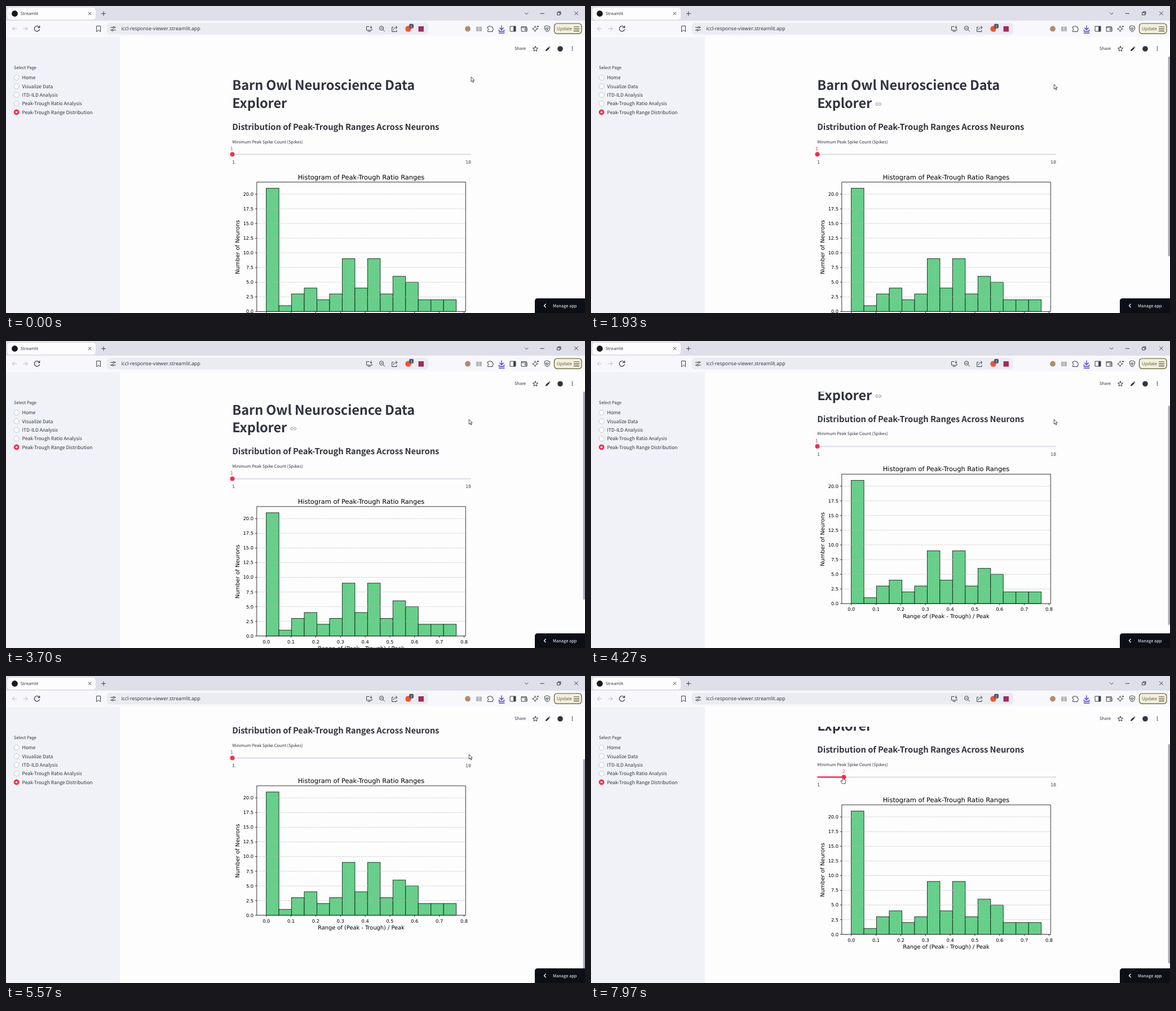
An HTML page for the animation above (8 s loop, 1027 by 545 pixels).

```html
<!DOCTYPE html>
<html lang="en">
<head>
<meta charset="utf-8">
<title>Data Explorer</title>
<style>
html, body { margin: 0; width: 100%; height: 100%; overflow: hidden; background: #fdfdfd; }
svg { display: block; width: 100vw; height: 100vh; }
text { text-rendering: geometricPrecision; white-space: pre; }
.ui { font-family: "Open Sans", "Noto Sans", sans-serif; }
.app { font-family: "Noto Sans CJK JP", "Noto Sans CJK SC", "Noto Sans CJK", "Noto Sans", sans-serif; fill: #31333f; }
.head { font-weight: 700; letter-spacing: -.005em; }
.mono { font-family: "DejaVu Sans Mono", monospace; font-size: 8.3px; fill: #4a4c57; }
.plot { font-family: "DejaVu Sans", sans-serif; fill: #000; }
.ico { fill: none; stroke: #3c3d4a; stroke-width: 1; stroke-linecap: round; stroke-linejoin: round; }
</style>
</head>
<body>
<svg viewBox="0 0 1027 545">
  <defs>
    <linearGradient id="strip">
      <stop offset="0" stop-color="#c9404c"/><stop offset=".35" stop-color="#e08c6c"/>
      <stop offset=".7" stop-color="#ecd08c"/><stop offset="1" stop-color="#f2eaa8"/>
    </linearGradient>
    <clipPath id="view"><path d="M202 90H1027V545H202z"/></clipPath>
    <g id="link" class="ico" style="stroke:#8d8f99">
      <path d="M-1.2-2.3H-2.6a2.3 2.3 0 0 0 0 4.6H-1.2M1.2-2.3H2.6a2.3 2.3 0 0 1 0 4.6H1.2M-1.8 0H1.8"/>
    </g>
  </defs>

  <!-- page content -->
  <g clip-path="url(#view)">
    <g id="page">
      <g id="titles"></g>
      <use id="link1" href="#link" x="509.7" y="174.2"/>
      <use id="link2" href="#link" x="775" y="214.7"/>
      <path d="M401.5 263.3H825" stroke="#e1e4ec" stroke-width="2.6"/>
      <path id="fill" stroke="#ee3350" stroke-width="2.6"/>
      <circle id="knob" cy="263.3" r="4" fill="#f0304c"/>
      <text id="value" class="mono" y="256" text-anchor="middle" style="fill:#e8455c"></text>
      <text class="mono" x="401" y="279.8">1</text>
      <text class="mono" x="825" y="279.8" text-anchor="end">10</text>
      <g id="chart"></g>
    </g>
    <rect id="thumb" x="1023.6" width="3.4" height="389.5" rx="1.7" fill="#a9aabb"/>
  </g>

  <!-- sidebar -->
  <path d="M0 55H202V545H0z" fill="#f0f2f7"/>
  <g id="side"></g>

  <!-- browser frame -->
  <path d="M0 0H1027V27H0z" fill="#dfdfe9"/>
  <path d="M0 26H1027V54H0z" fill="#f8f8fc"/>
  <rect x="2.5" y="3" width="156.5" height="21" rx="5" fill="#fdfdfe"/>
  <rect x="179" y="30" width="570" height="20.5" rx="5" fill="#ebebf2"/>
  <path d="M0 54.3H1027" stroke="url(#strip)" stroke-width="1.6"/>
  <circle cx="15.5" cy="13.5" r="5.4" fill="#17181f"/>
  <g class="ico">
    <path d="M146.200 11l4.600 4.600m0-4.600l-4.600 4.600M173 10v7m-3.500-3.500h7M920.500 12l2.800 2.800 2.800-2.800M948 13.300h6.500M1008.500 10l6 6m0-6l-6 6"/>
    <path d="M978 11.500h4.500V16H978zM979.500 11.500V10H984v4.500H982.500"/>
    <path d="M18.500 40.300H11.500m3.500-3.800L11.200 40.300 15 44.100M31 40.300H38m-3.500-3.800L38.300 40.300 34.500 44.100" stroke="#b9bac4"/>
    <path d="M59.200 38a4.700 4.700 0 1 0 .3 3.700M59.700 35.300V38.500H56.500" stroke-width="1.200"/>
    <path d="M161 35.500h6.500V45.500L164.200 42.700 161 45.500z"/>
    <path d="M185.500 38h4m3.500 0h1.500M185.500 42.800h1.500m4 0h3.500"/>
    <circle cx="191.200" cy="38" r="1.500"/><circle cx="188.800" cy="42.800" r="1.500"/>
    <path d="M644 36.500H639.500V43H649V41M642 45h4.500M647.500 35.500v4m-1.700-1.600 1.700 1.700 1.700-1.700"/>
    <circle cx="666" cy="39.300" r="3.600"/><path d="M668.700 42l3 3M664.400 39.300h3.200"/>
    <path d="M687 37.500H684.700V45.500H693V43M687.500 42.500c0-3 2-4.500 6-4.500M691.500 35.500l2.500 2.500-2.500 2.500"/>
    <path d="M854.500 37h2.300a1.600 1.600 0 1 1 3.200 0H863v2.800a1.600 1.600 0 1 1 0 3.200V45.500H854.500V43a1.600 1.600 0 1 0 0-3.200z"/>
    <path d="M879 35v7m-3.200-3 3.200 3.200 3.200-3.200M874.500 42.500V45H883.500V42.500M874.500 48h9.500" stroke="#4b35c8" stroke-width="1.300"/>
    <path d="M894.500 36h9.500v9h-9.500z"/><path d="M901 36.500h2.500v8H901z" fill="#3c3d4a"/>
    <path d="M914.500 36.500h8.500v2H924v6.500H914.500zM914.500 38.500H923M924 40.500H920.500v2.500H924"/>
    <path d="M938.500 35.500q.6 4.400 5 5-4.400.6-5 5-.6-4.400-5-5 4.400-.6 5-5zM943.500 35v2.500m-1.250-1.250h2.500"/>
    <path d="M960 35l4.500 1.500v3.500q-.3 4-4.500 6-4.200-2-4.500-6V36.500zM957.800 39h4.400l-2.200 4z"/>
  </g>
  <circle cx="713.500" cy="40.500" r="5.200" fill="#ee5530"/>
  <rect x="715" y="31.800" width="8" height="8" rx="2.500" fill="#4c5566"/>
  <text class="ui" x="719" y="38" font-size="5.5" fill="#fff" text-anchor="middle">2</text>
  <rect x="731.500" y="36" width="9.500" height="9.500" fill="#a02a62"/>
  <circle cx="819" cy="40.500" r="4.900" fill="#b08b6c"/>
  <path d="M834 36.500h4.600v8.500H834zM839.400 36.500H844v8.500h-4.600z" fill="#b4b5bd"/>
  <rect x="972.500" y="31" width="48.500" height="18.200" rx="5" fill="#f1efdd" stroke="#5f5b30" stroke-width="1.200"/>
  <path d="M1007 37h10M1007 40.700h10M1007 44.400h10" stroke="#4a4724" stroke-width="1.200"/>
  <text class="ui" x="977" y="43.300" font-size="7.9" fill="#5c582f">Update</text>
  <text class="ui" x="26" y="16.200" font-size="7.5" fill="#2c2d38">Streamlit</text>
  <text class="ui" x="204.300" y="43.400" font-size="8.85" fill="#2c2d38">iccl-response-viewer.streamlit.app</text>

  <!-- app header and footer button -->
  <g class="ico" style="stroke:#31333f">
    <path d="M939 71.500l1.300 3 3.200.3-2.400 2.100.7 3.200-2.800-1.700-2.800 1.700.7-3.200-2.400-2.100 3.200-.3z"/>
  </g>
  <path d="M957 80l.3-2.300 4.800-4.800 2 2-4.800 4.800zM962.700 72.300l.8-.8 2 2-.8.8z" fill="#31333f"/>
  <circle cx="983" cy="76" r="4.800" fill="#31333f"/>
  <path d="M1004.500 72.800v.01m0 2.890v.01m0 2.890v.01" stroke="#31333f" stroke-width="1.900" stroke-linecap="round"/>
  <path d="M938 545V524q0-5 5-5H1027V545z" fill="#0c0f16"/>
  <path d="M957.500 528.800l-3 3.200 3 3.200" fill="none" stroke="#fff" stroke-width="1.300"/>
  <g id="labels"></g>

  <g id="cursor" stroke="#222" stroke-width=".8" stroke-linejoin="round" fill="#fff">
    <path id="arrow" d="M0 0V8.600L2 6.800 3.400 10 4.800 9.400 3.400 6.300H6z"/>
    <path id="hand" d="M-1 .8Q0-.4 1 .8V4.200L4.300 5Q5.200 5.300 5 6.500L4.200 11.500H-1.500L-4 7.300Q-4 5.800-2.600 6.400L-1 7.600z"/>
  </g>
</svg>
<script>
const $ = id => document.getElementById(id);
const LOOP = 8000, RED = '#f0304c';

// Nominal sizes; the installed face draws its Latin about 1.117 times larger.
const appText = (x, y, size, str, more = '') =>
  `<text class="app ${more}" x="${x}" y="${y}" font-size="${size / 1.117}">${str}</text>`;

$('titles').innerHTML =
  appText(401.3, 149.3, 26.3, 'Barn Owl Neuroscience Data', 'head') +
  appText(401.3, 180.9, 26.3, 'Explorer', 'head') +
  appText(401.3, 219.8, 16.5, 'Distribution of Peak-Trough Ranges Across Neurons', 'head') +
  appText(401.3, 243.6, 8.37, 'Minimum Peak Spike Count (Spikes)');

$('labels').innerHTML = appText(902, 78.4, 8.37, 'Share') +
  `<g style="--c:#fff">${appText(970, 534.6, 8.37, 'Manage app')}</g>`;
$('labels').lastChild.firstChild.style.fill = '#fff';

const pages = ['Home', 'Visualize Data', 'ITD-ILD Analysis',
  'Peak-Trough Ratio Analysis', 'Peak-Trough Range Distribution'];
$('side').innerHTML = appText(14, 112.3, 8.37, 'Select Page') + pages.map((name, i) => {
  const y = 127.2 + 15.33 * i, on = i === 4;
  return `<circle cx="18.7" cy="${y}" r="4.6" fill="${on ? RED : '#fbfbfd'}" stroke="${on ? RED : '#b9bcc8'}" stroke-width=".8"/>` +
    (on ? `<circle cx="18.7" cy="${y}" r="1.8" fill="#fff"/>` : '') +
    appText(28.5, y + 3.2, 9.5, name);
}).join('');

function drawChart() {
  const counts = [21, 1, 3, 4, 2, 3, 9, 4, 9, 3, 6, 5, 2, 2, 2];
  const left = 444.8, right = 815.3, top = 312.6, base = 542.4;
  const yOf = n => base - 10.42 * n, barW = 22.47;
  const label = (x, y, size, str, anchor = 'middle', more = '') =>
    `<text class="plot" x="${x}" y="${y}" font-size="${size}" text-anchor="${anchor}" ${more}>${str}</text>`;
  let bars = '', grid = '', ticks = '', out = '';
  counts.forEach((n, i) => {
    bars += `<rect x="${461.6 + barW * i}" y="${yOf(n)}" width="${barW}" height="${base - yOf(n)}"/>`;
  });
  for (let n = 0; n <= 20; n += 2.5) {
    grid += `M${left} ${yOf(n)}H${right}`;
    ticks += `M${left} ${yOf(n)}h-2.9`;
    out += label(439, yOf(n) + 3, 8.25, n.toFixed(1), 'end');
  }
  for (let i = 0; i <= 8; i++) {
    const x = 461.7 + 43.85 * i;
    ticks += `M${x} ${base}v2.9`;
    out += label(x, 555.4, 8.25, (i / 10).toFixed(1));
  }
  out += label(630, 307.7, 11.42, 'Histogram of Peak-Trough Ratio Ranges') +
    label(630, 567.8, 9.84, 'Range of (Peak - Trough) / Peak') +
    label(0, 0, 9.84, 'Number of Neurons', 'middle', 'transform="translate(414.3 428) rotate(-90)"');
  $('chart').innerHTML =
    `<g fill="#67cf89" stroke="#10241a" stroke-width=".9">${bars}</g>` +
    `<path d="${grid}" stroke="#b0b0b0" stroke-opacity=".75" stroke-width=".8" stroke-dasharray="2.6 1.1"/>` +
    `<path d="${ticks}M${left} ${top}H${right}V${base}H${left}z" fill="none" stroke="#111" stroke-width=".85"/>` + out;
}
drawChart();

// Keys are [time, value, eased]; values hold before the first and after the last.
function track(keys, t) {
  const i = keys.findIndex(k => k[0] > t);
  if (i < 0) return keys[keys.length - 1][1];
  if (i === 0) return keys[0][1];
  const [t0, a] = keys[i - 1], [t1, b, eased] = keys[i];
  const p = (t - t0) / (t1 - t0);
  return a + (b - a) * (eased ? p * p * (3 - 2 * p) : p);
}

const scrollKeys = [[3600, 0], [3700, 18.6], [4270, 76.2], [4650, 127.2, 1], [5450, 127.2], [5850, 83.8, 1]];
const xKeys = [[150, 825], [700, 821.3, 1], [6250, 821.3], [7150, 402, 1], [7500, 402], [7800, 447, 1]];
const yKeys = [[150, 125.8], [700, 139, 1], [6250, 139], [7150, 179.5, 1]];
const show = (id, on) => $(id).setAttribute('visibility', on ? 'visible' : 'hidden');

function render(t) {
  const scroll = track(scrollKeys, t);
  $('page').setAttribute('transform', `translate(0 ${-scroll})`);
  $('thumb').setAttribute('y', 55 + scroll * .785);
  show('thumb', t > 330);
  show('link1', t > 330 && t < 4500);
  show('link2', t > 5750 && t < 6500);

  const x = track(xKeys, t), gripped = t > 7080;
  $('cursor').setAttribute('transform', `translate(${x} ${track(yKeys, t)})`);
  show('arrow', !gripped);
  show('hand', gripped);

  const value = t > 7650 ? 2 : 1, knobX = 401.5 + 47 * (value - 1);
  $('knob').setAttribute('cx', knobX);
  $('fill').setAttribute('d', `M401.5 263.3H${knobX}`);
  $('value').setAttribute('x', knobX - (value === 1 ? 1.2 : .3));
  $('value').textContent = value;
}

const start = performance.now();
function frame() {
  render((performance.now() - start) % LOOP);
  requestAnimationFrame(frame);
}
frame();
</script>
</body>
</html>
```
